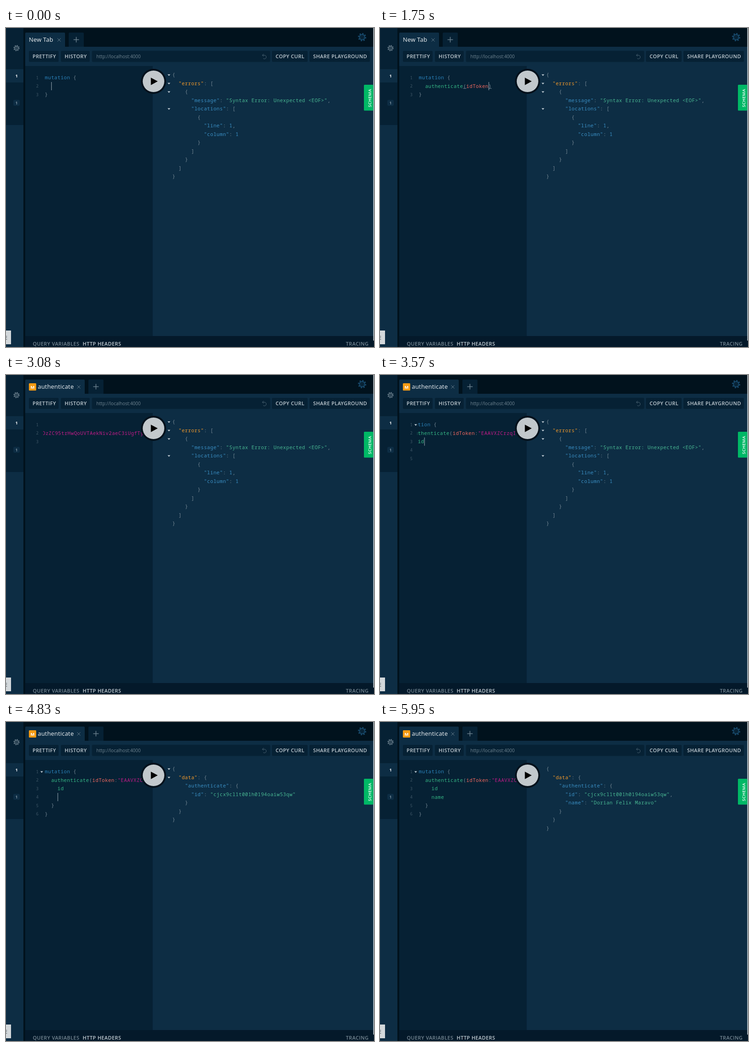
An HTML page that plays this animation: 804 px wide and 697 px high, repeating every 6.02 s.

```html
<!DOCTYPE html>
<html lang="en">
<head>
<meta charset="utf-8">
<title>Playground demo</title>
<style>
  html, body { margin: 0; width: 100%; height: 100%; overflow: hidden; background: #01121d; }
  svg { display: block; width: 100%; height: 100%; }
  text { font-family: "Open Sans", sans-serif; white-space: pre; }
  .code text { font-family: "Noto Sans Mono", "DejaVu Sans Mono", monospace; }
  .btn { font-size: 11px; font-weight: 600; letter-spacing: .38px; fill: #c3cdd4; }
  .tab { font-size: 13px; letter-spacing: .2px; fill: #f2f5f7; }
</style>
</head>
<body>
<svg viewBox="0 0 804 697" xmlns="http://www.w3.org/2000/svg">
  <defs>
    <clipPath id="editorClip"><rect x="81" y="84" width="217" height="588"/></clipPath>
    <clipPath id="listClip"><rect x="108" y="173" width="107" height="217"/></clipPath>
  </defs>

  <rect width="804" height="697" fill="#01121d"/>
  <rect width="38" height="697" fill="#0d2d44"/>
  <rect width="38" height="212" fill="#062134"/>
  <rect y="90" width="38" height="29" fill="#0d2d44"/>
  <g id="sideGear"></g>
  <text x="23" y="107.5" font-size="9" font-weight="700" fill="#fff" text-anchor="middle">1</text>
  <rect x="16" y="157" width="14" height="13" rx="3" fill="#0d2d44"/>
  <text x="23" y="167" font-size="9" font-weight="600" fill="#93a6b3" text-anchor="middle">1</text>
  <rect x="-4" y="661" width="15" height="30" fill="#d3d8db"/>
  <text x="-2.8" y="680.5" font-size="10" font-weight="600" fill="#4c5960">E</text>

  <g id="tabs"></g>
  <g id="mainGear"></g>

  <rect x="42" y="41" width="761" height="632" fill="#0d2d44"/>
  <rect x="42" y="83" width="278.5" height="590" fill="#062134"/>
  <g id="toolbar"></g>
  <rect x="188" y="50" width="389" height="24" rx="2" fill="#062134" stroke="#082539"/>
  <text x="197.5" y="65.5" font-size="10" fill="#6f8491">http://localhost:4000</text>
  <path d="M560.5 59.5h4.5a4 4 0 1 1 -3 7M563 56.5l-3 3 3 3" fill="none" stroke="#4a6272"/>

  <rect x="42" y="673" width="762" height="24" fill="#04192a"/>
  <text class="btn" x="58.5" y="694" style="fill:#748692">QUERY VARIABLES</text>
  <text class="btn" x="167.5" y="694">HTTP HEADERS</text>
  <text class="btn" x="742.5" y="694" style="fill:#748692">TRACING</text>

  <g class="code">
    <g id="gutter"></g>
    <g clip-path="url(#editorClip)"><g id="editor"></g></g>
    <g id="result"></g>
  </g>

  <circle cx="322.3" cy="116.5" r="27.5" fill="#03111c"/>
  <circle cx="322.3" cy="116.5" r="23.6" fill="#c2c8cc"/>
  <path d="M316.5 108.5L331.5 116.5L316.5 124.8Z" fill="#000"/>

  <rect x="802.5" width="1.5" height="683" fill="#c9d1d6"/>
  <rect x="782" y="124" width="20.5" height="56.5" rx="1.5" fill="#00b866"/>
  <text transform="translate(797.5 173) rotate(-90)" font-size="9.4" font-weight="600" letter-spacing=".3" fill="#fff">SCHEMA</text>

  <g id="popup"></g>
</svg>
<script>
const LOOP = 6020, TICK = 70;
const COL = 6.92, ROW = 18.5;
const CODE_SIZE = 10.8, CODE_GAP = COL - CODE_SIZE * 0.6;
const EDITOR = { x: 84.8, y: 112.2 };
const RESULT = { x: 363.2, y: 106.2 };
const COLORS = {
  key: '#3a8fc4', root: '#f39a2b', str: '#48b692', num: '#3a8fc4', punct: '#738693',
  keyword: '#2a80b8', field: '#35b685', arg: '#f0685f', token: '#c01c88'
};
const $ = id => document.getElementById(id);

const escapeText = s => s.replace(/&/g, '&amp;').replace(/</g, '&lt;');
const span = ([kind, s]) => `<tspan fill="${COLORS[kind]}">${escapeText(s)}</tspan>`;

function codeLine(origin, row, col, parts) {
  const x = origin.x + col * COL, y = origin.y + row * ROW;
  return `<text x="${x}" y="${y}" font-size="${CODE_SIZE}" letter-spacing="${CODE_GAP}">${parts.map(span).join('')}</text>`;
}
const foldArrow = (x, y) => `<path d="M${x - 3} ${y - 1.5}h6l-3 3.4z" fill="#c0ccd4"/>`;

function gear(x, y, r, color) {
  const ring = 2 * Math.PI * r * 0.87;
  return `<g transform="translate(${x} ${y})" fill="none" stroke="${color}">
    <circle r="${r * 0.87}" stroke-width="${r * 0.27}" stroke-dasharray="${ring / 16}"/>
    <circle r="${r * 0.62}" stroke-width="${r * 0.24}"/><circle r="${r * 0.27}" stroke-width="1"/></g>`;
}

function drawStatic() {
  $('sideGear').innerHTML = gear(23, 44, 6.7, '#647987');
  $('mainGear').innerHTML = gear(778, 20, 9, '#184a6c');
  const buttons = [[50, 65, 'PRETTIFY'], [120, 63, 'HISTORY'], [581, 78, 'COPY CURL'], [663, 132, 'SHARE PLAYGROUND']];
  $('toolbar').innerHTML = buttons.map(([x, w, label]) =>
    `<rect x="${x}" y="50" width="${w}" height="24" rx="2" fill="#062134"/>
     <text class="btn" x="${x + 8}" y="66">${label}</text>`).join('');
}

function drawTabs(named) {
  const w = named ? 130 : 87, right = 42 + w, close = right - 13, plus = right + 24.5;
  const badge = `<rect x="50" y="18" width="16" height="16" rx="1.5" fill="#f59a12"/>
    <text x="58" y="29.5" font-size="9.5" font-weight="700" fill="#fff" text-anchor="middle">M</text>`;
  $('tabs').innerHTML = `
    <path d="M42 42V12q0-2 2-2h${w - 4}q2 0 2 2v30z" fill="#0d2d44"/>
    <path d="M${right + 8} 41V12q0-2 2-2h29q2 0 2 2v29z" fill="#062134"/>
    ${named ? badge : ''}
    <text class="tab" x="${named ? 69.5 : 50}" y="30.3">${named ? 'authenticate' : 'New Tab'}</text>
    <path d="M${close - 3.5} 22.5l7 7m0-7l-7 7" stroke="#657b89"/>
    <path d="M${plus - 6} 25.5h12m-6-6v12" stroke="#6a7f8c" stroke-width="1.5"/>`;
}

// A long made-up token: fixed ends with a seeded middle.
function makeToken() {
  const set = 'ABCDEFGHJKLMNPQRSTUVWXYZabcdefghijkmnopqrstuvwxyz0123456789';
  let seed = 7, middle = '';
  for (let i = 0; i < 120; i++) {
    seed = (seed * 16807) % 2147483647;
    middle += set[seed % set.length];
  }
  return 'EAAVXZCrzqI' + middle + 'DzZC95trHwQoUVTAekNiv2aeC3iUgfTy';
}
const token = makeToken();
const pasteScroll = EDITOR.x + (24 + token.length - 32) * COL - 79.5;

const typed = (word, start, t) =>
  word.slice(0, Math.max(0, Math.floor((t - start) / TICK) + 1));

function editorState(t) {
  const call = typed('authenticate', 70, t);
  const lines = [[0, [['keyword', 'mutation'], ['punct', ' {']]]];
  const parts = [['field', call]];
  let row = 1, col = 2 + call.length, scroll = 0, match = 0;

  if (t >= 910) {
    const arg = typed('idToken', 1260, t);
    const colon = t >= 1820 ? ':' : '';
    const value = t >= 2380 ? `"${token}"` : t >= 2030 ? '""' : '';
    parts.push(['punct', '('], ['arg', arg], ['punct', colon], ['token', value], ['punct', ')']);
    col = 15 + arg.length + colon.length + value.length;
    if (!value) match = col;
    else if (t < 2380) col--;
    if (t >= 2380) scroll = pasteScroll;
  }
  lines.push([2, parts]);

  if (t >= 3360) {
    const id = typed('id', 3500, t);
    parts.push(['punct', ' {']);
    lines.push([4, [['field', id]]]);
    row = 2; col = 4 + id.length; scroll = 29.8;
    if (t >= 4690) {
      const name = t >= 5320 ? 'name' : typed('na', 4970, t);
      lines.push([4, [['field', name]]]);
      row = 3; col = 4 + name.length; scroll = 0;
    }
    lines.push([2, [['punct', '}']]]);
  }
  lines.push([0, [['punct', '}']]]);
  return { lines, row, col, scroll, match, fold: t >= 3360, cursor: t < 5600 };
}

function drawEditor(t) {
  const s = editorState(t);
  $('gutter').innerHTML = s.lines.map((_, i) =>
    `<text x="68.5" y="${EDITOR.y - .4 + i * ROW}" font-size="9" fill="#3f5767" text-anchor="middle">${i + 1}</text>`
  ).join('') + (s.fold ? foldArrow(78, 109) : '');

  let out = s.lines.map(([col, parts], i) => codeLine(EDITOR, i, col, parts)).join('');
  if (s.match) {
    for (const col of [14, s.match])
      out += `<path d="M${EDITOR.x + col * COL} 132h${COL}" stroke="#738693"/>`;
  }
  if (s.cursor) {
    const x = EDITOR.x + s.col * COL + .2, y = 99.5 + s.row * ROW;
    out += `<rect x="${x}" y="${y}" width="1" height="18" fill="#9fafb8"/>`;
  }
  $('editor').innerHTML = out;
  $('editor').setAttribute('transform', `translate(${-s.scroll} 0)`);
}

const failure = { errors: [{ message: 'Syntax Error: Unexpected <EOF>', locations: [{ line: 1, column: 1 }] }] };
const user = { id: 'cjcx9cl1t001h0194oaiw53qw' };
const success = fields => ({ data: { authenticate: fields } });

function jsonParts(line) {
  const bits = line.match(/"[^"]*"|\d+|[^"\d]+/g);
  return bits.map((bit, i) => {
    if (bit[0] !== '"') return [/\d/.test(bit) ? 'num' : 'punct', bit];
    if (!(bits[i + 1] || '').startsWith(':')) return ['str', bit];
    return [/errors|data/.test(bit) ? 'root' : 'key', bit];
  });
}

function drawResult(t) {
  const [data, folds] = t < 3920 ? [failure, [0, 1, 2, 4]]
    : t < 5740 ? [success(user), [0, 1]]
    : [success({ ...user, name: 'Dorian Felix Maravo' }), []];
  const lines = JSON.stringify(data, null, 2).split('\n');
  $('result').innerHTML = lines.map((line, i) => {
    const body = line.trimStart();
    return codeLine(RESULT, i, line.length - body.length, jsonParts(body));
  }).join('') + folds.map(i => foldArrow(356, 102.8 + i * ROW)).join('');
}

function drawPopup(open) {
  const items = ['name', 'language', 'last_name', 'sentDates', 'first_name', 'onboarding',
    'oneSignalId', 'sentMessages', 'notificationSettings'];
  const label = (s, y, color) => `<text x="117.5" y="${y}" font-size="10.7" fill="${color}">${s}</text>`;
  $('popup').innerHTML = !open ? '' : `
    <rect x="108" y="173" width="107" height="247.5" fill="#fff"/>
    <rect x="108" y="173" width="107" height="25.5" fill="#078ade"/>
    <g clip-path="url(#listClip)">${items.map((s, i) => label(s, 190 + i * 25.5, i ? '#858585' : '#fff')).join('')}</g>
    <path d="M108 390h107" stroke="#e2e2e2"/>${label('String!', 409.5, '#e5a02f')}`;
}

let shown = -1;
function update(now) {
  const t = Math.floor((now % LOOP) / TICK) * TICK;
  if (t !== shown) {
    shown = t;
    drawTabs(t >= 2030);
    drawEditor(t);
    drawResult(t);
    drawPopup(t >= 4970 && t < 5320);
  }
}

drawStatic();
update(0);
const start = performance.now();
(function frame() {
  update(performance.now() - start);
  requestAnimationFrame(frame);
})();
</script>
</body>
</html>
```
